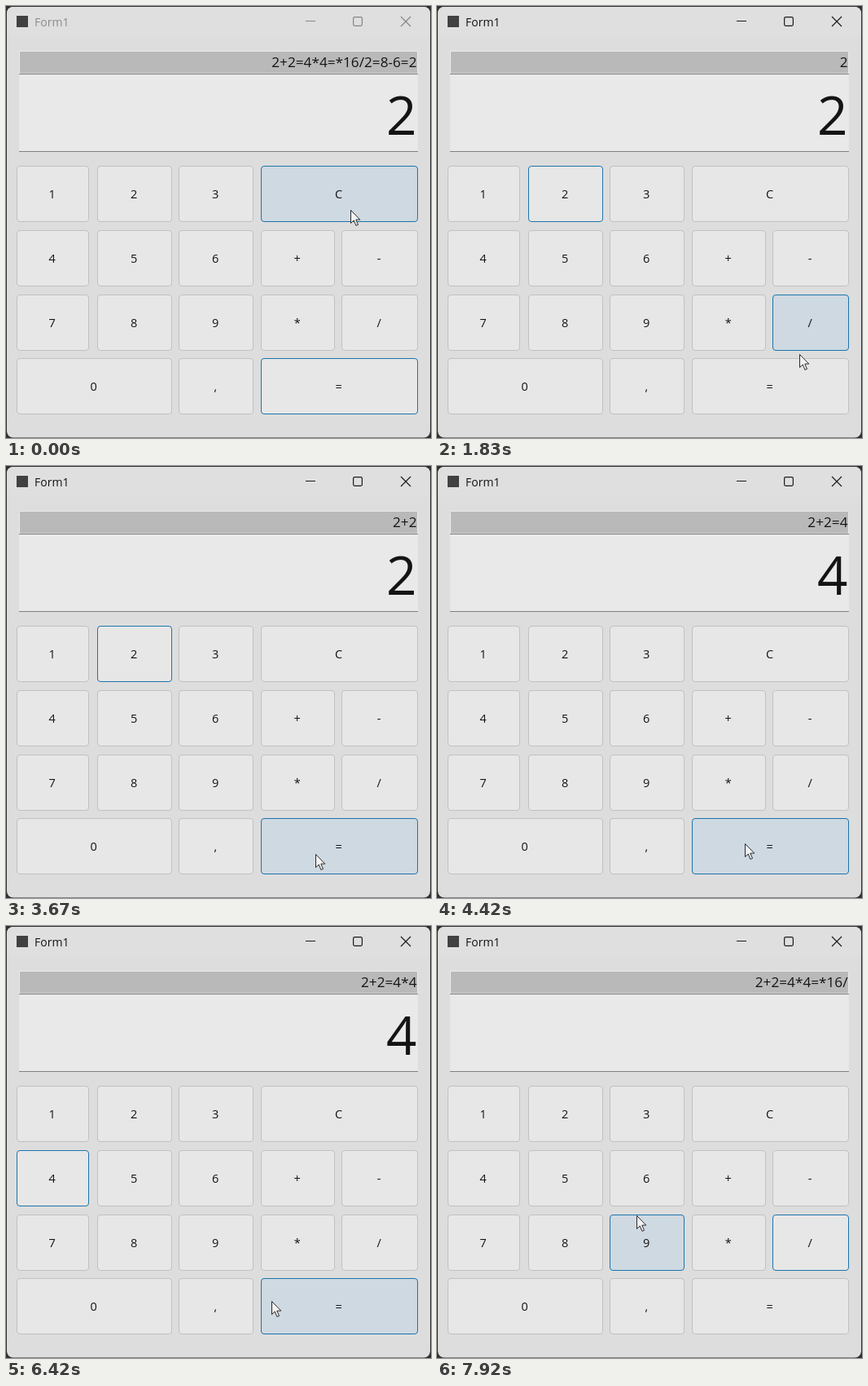
Write an HTML page that moves like this. It is 522 px wide and 530 px high and loops after 8 s.

```html
<!DOCTYPE html>
<html lang="en">
<head>
<meta charset="utf-8">
<title>Calculator</title>
<style>
  html, body { margin: 0; width: 100%; height: 100%; overflow: hidden; background: #303033; }
  svg { display: block; width: 522px; height: 530px; }
  text { font-family: "Open Sans", "Noto Sans", sans-serif; fill: #141414; }
  .key rect { fill: #e7e7e7; stroke: #c1c1c1; }
  .key text { font-size: 14.5px; text-anchor: middle; }
  .key.focus rect { stroke: #1c74ac; }
  .key.hover rect { fill: #ced9e2; stroke: #1c74ac; }
  .key.press rect { fill: #bccfdd; stroke: #1c5f92; }
  .readout { text-anchor: end; }
  #controls { fill: none; stroke: #1a1a1a; stroke-width: 1.2; }
  .inactive #title { fill: #8c8c8c; }
  .inactive #controls { stroke: #858585; }
</style>
</head>
<body>
<svg id="stage" viewBox="0 0 522 530">
  <rect x="1" y="1" width="520" height="528.5" rx="8" fill="#dddddd"/>
  <path d="M1 38V9a8 8 0 0 1 8-8H513a8 8 0 0 1 8 8V38Z" fill="#dfdfe0"/>
  <rect x="13" y="12" width="14" height="14" fill="#414141"/>
  <text id="title" x="35" y="25" font-size="14">Form1</text>
  <g id="controls">
    <path d="M368 18.5h12M485 13l12 12m0-12-12 12"/>
    <rect x="426.6" y="13.6" width="10.8" height="10.8" rx="1.8"/>
  </g>
  <rect x="16" y="55" width="490" height="124" fill="#e9e9e9"/>
  <rect x="17" y="56" width="488" height="26.5" fill="#b9b9b9"/>
  <path d="M16 83.5H506M16 178.5H506" stroke="#818181"/>
  <text id="history" class="readout" x="504.5" y="75" font-size="17.2"></text>
  <text id="display" class="readout" x="504.5" y="158" font-size="65.5"></text>
  <g id="keys"></g>
  <path id="cursor" d="M-.5.5V16.5L3.2 13l2.7 6.4 2.6-1.1-2.7-6.2h5Z"
        fill="#f2f2f2" stroke="#2a2a2a" stroke-linejoin="round"/>
</svg>
<script>
const LOOP = 8000, STEP = LOOP / 96;
const PRESS = 85, HOVER_LAG = 60, REST_BEFORE = 300, REST_AFTER = 60;
const KEY_HEIGHT = 69;
const $ = id => document.getElementById(id);

// A repeated label is one key spanning several columns.
const grid = ["123CC", "456+-", "789*/", "00,=="];
const lefts = [13, 112, 212, 313, 412], rights = [102, 204, 304, 404, 506];

const keys = {};
grid.forEach((labels, row) => {
  for (const label of new Set(labels)) {
    const left = lefts[labels.indexOf(label)];
    const width = rights[labels.lastIndexOf(label)] - left;
    const top = Math.round(196 + 78.8 * row);
    const node = document.createElementNS("http://www.w3.org/2000/svg", "g");
    node.innerHTML =
      `<rect x="${left + .5}" y="${top + .5}" width="${width - 1}" height="${KEY_HEIGHT - 1}" rx="3.5"/>` +
      `<text x="${left + width / 2 - .8}" y="${top + 40}">${label}</text>`;
    $("keys").append(node);
    keys[label] = {
      node,
      point: (across, down) => [left + width * across, top + KEY_HEIGHT * down],
      contains: ([x, y]) => x >= left && x < left + width && y >= top && y < top + KEY_HEIGHT
    };
  }
});

// Pointer visits: time, key, place within the key, and the readouts if it is clicked.
const visits = [
  [417, "C", .576, .78, "", ""],
  [1417, "2", .6, .64, "2", "2"],
  [1833, "/", .36, 1.06],
  [2080, "=", .6, .7],
  [2660, "+", .88, .55, "2+", ""],
  [3250, "2", .58, .64, "2+2", "2"],
  [3667, "=", .35, .64],
  [4080, "=", .35, .64, "2+2=4", "4"],
  [5580, "*", .66, .51, "2+2=4*", ""],
  [6080, "4", .7, .58, "2+2=4*4", "4"],
  [6340, "=", .073, .41],
  [6920, "=", .073, .41, "2+2=4*4=*16", "16"],
  [7665, "/", .4, .67, "2+2=4*4=*16/", ""],
  [7917, "9", .37, .02],
  [8200, "2", .5, .5]
].map(([time, key, across, down, history, display]) => {
  const clicked = history !== undefined;
  return {
    time, key, history, display, clicked,
    point: keys[key].point(across, down),
    arrive: time - (clicked ? REST_BEFORE : 0),
    leave: time + (clicked ? REST_AFTER : 0)
  };
});

const clicks = [
  { time: -LOOP, key: "=", history: "2+2=4*4=*16/2=8-6=2", display: "2" },
  ...visits.filter(visit => visit.clicked)
];

function pointerAt(t) {
  const i = Math.max(1, visits.findIndex(visit => visit.arrive > t));
  const from = visits[i - 1], to = visits[i];
  const p = Math.min(1, Math.max(0, (t - from.leave) / (to.arrive - from.leave)));
  const ease = p * p * (3 - 2 * p);
  return from.point.map((start, axis) => start + (to.point[axis] - start) * ease);
}

function render(t) {
  const done = clicks.findLast(click => click.time <= t);
  const active = clicks.findLast(click => click.time - PRESS <= t);
  const hoverPoint = pointerAt(t - HOVER_LAG);

  $("history").textContent = done.history;
  $("display").textContent = done.display;
  $("stage").classList.toggle("inactive", active === clicks[0]);
  $("cursor").setAttribute("transform", `translate(${pointerAt(t).map(Math.round)})`);
  for (const [label, { node, contains }] of Object.entries(keys)) {
    const focus = label === active.key;
    node.setAttribute("class", "key" + (focus ? " focus" : "") +
      (contains(hoverPoint) ? " hover" : "") + (focus && active !== done ? " press" : ""));
  }
}

const start = performance.now();
function tick() {
  const t = (performance.now() - start) % LOOP;
  render(Math.floor((t + 4) / STEP) % 96 * STEP);
  requestAnimationFrame(tick);
}
tick();
</script>
</body>
</html>
```
